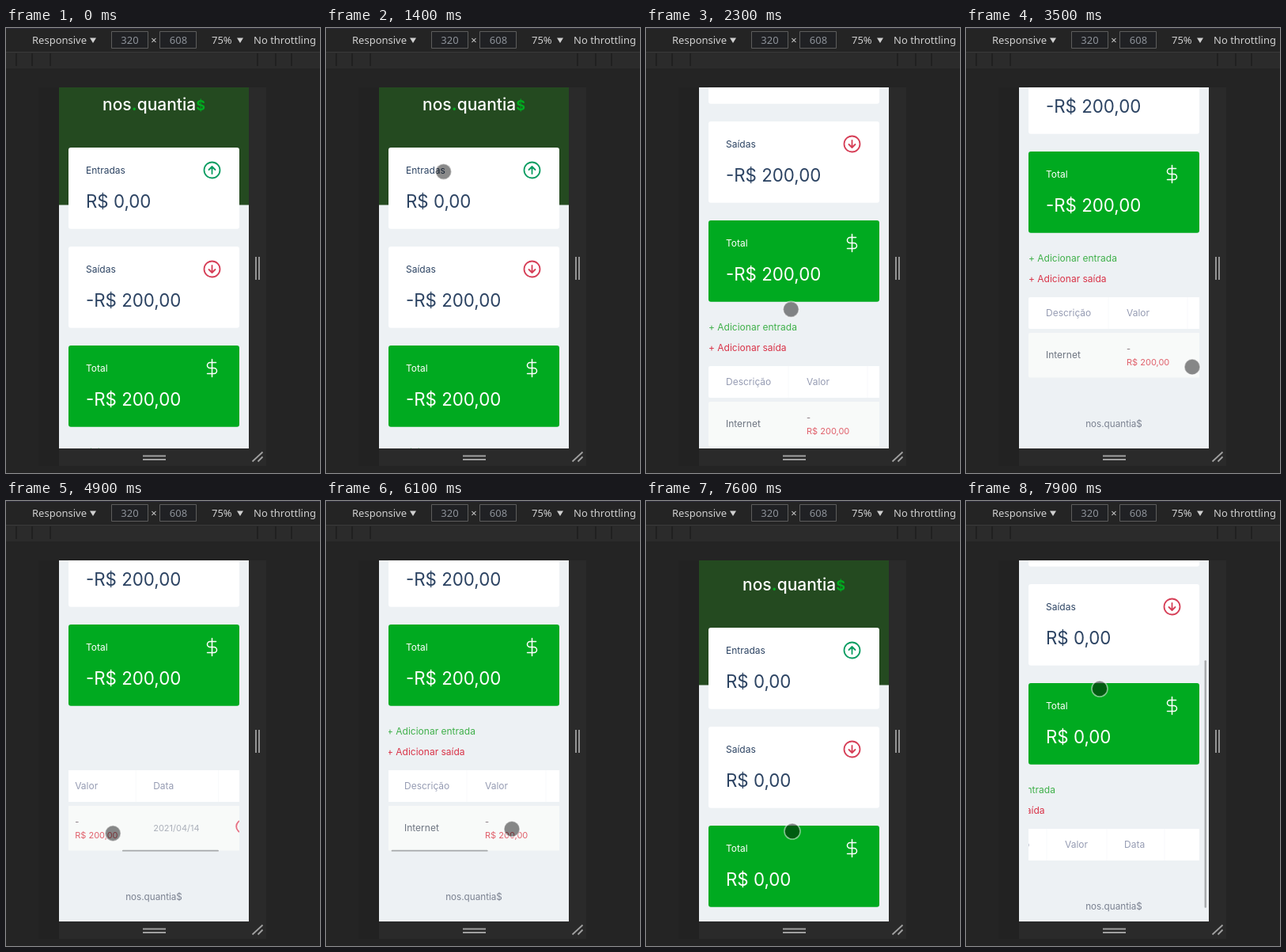
Recreate the animation shown at these times as an HTML page. Size 397 by 562 pixels, loop 8000 ms.

```html
<!DOCTYPE html>
<html lang="pt-BR">
<head>
<meta charset="utf-8">
<style>
  html, body { margin: 0; width: 100%; height: 100%; overflow: hidden; background: #242424; }
  svg { display: block; }
  text { font: 12px Inter, sans-serif; white-space: pre; }
  .bar text { font: 13px "Noto Sans", sans-serif; fill: #d0d0d0; }
  .bar .dim { fill: #8d9299; }
  .logo { font-size: 21px; font-weight: 500; fill: #fff; }
  .logo tspan { font-weight: 700; fill: #00aa20; }
  .value { font-size: 22.3px; }
  .small { font-size: 11px; }
  .card { fill: #2d4463; }
  .total { fill: #fff; }
  .head { fill: #969cb3; }
  .line { fill: none; stroke-width: 1.8; stroke-linecap: round; stroke-linejoin: round; }
</style>
</head>
<body>
<svg width="397" height="562" viewBox="0 0 397 562">
  <defs>
    <clipPath id="pageClip"><rect x="67" y="75" width="240" height="456"/></clipPath>
    <clipPath id="tableClip"><rect x="79" y="530" width="216" height="180"/></clipPath>
  </defs>

  <!-- Toolbar and ruler -->
  <g class="bar">
    <rect width="397" height="562" fill="#242424"/>
    <rect width="397" height="1" fill="#2b2a38"/>
    <rect y="30" width="397" height="1" fill="#3a3a3a"/>
    <rect y="31" width="397" height="20" fill="#2b2b2b"/>
    <path d="M13 32v16M33 32v16M56 32v16M318 32v16M341 32v16M361 32v16" stroke="#202020" stroke-width="2"/>
    <text x="33" y="20">Responsive</text>
    <path d="M106 12.5h8l-4 6.5zM292 12.5h8l-4 6.5z" fill="#d0d0d0"/>
    <path d="M133.5 4.5h46v21h-46zM194.5 4.5h46v21h-46z" fill="#202124" stroke="#5c5c5c"/>
    <text class="dim" x="156.5" y="20" text-anchor="middle">320</text>
    <text x="187" y="20" text-anchor="middle">×</text>
    <text class="dim" x="218" y="20" text-anchor="middle">608</text>
    <text x="260" y="20">75%</text>
    <text x="313" y="20">No throttling</text>
  </g>

  <!-- Device frame -->
  <rect x="41" y="75" width="26" height="478" fill="#222"/>
  <path d="M307 75h22v478H67v-22h240z" fill="#2a2a2a"/>
  <path d="M316 289v29M320 289v29M173 540.5h29M173 545h29M311.5 547.5l13-12M318.5 547.5l6-6" stroke="#a0a0a0" stroke-width="1.8"/>

  <!-- Page, laid out at scroll zero -->
  <g clip-path="url(#pageClip)">
    <rect x="67" y="75" width="240" height="456" fill="#edf1f4"/>
    <g id="page">
      <rect x="67" y="75" width="240" height="157.5" fill="#244a20"/>
      <text class="logo" x="122" y="113">nos<tspan>.</tspan>quantia<tspan style="font-size:18px">$</tspan></text>
      <g id="cards"></g>
      <g clip-path="url(#tableClip)">
        <g id="table">
          <text x="79" y="549" fill="#3fb04a">+ Adicionar entrada</text>
          <text x="79" y="575" fill="#d93348">+ Adicionar saída</text>
          <rect x="79" y="594" width="368" height="40" rx="2" fill="#fff"/>
          <path id="edges" stroke="#f8f9fb"/>
          <text class="head" x="101" y="618">Descrição</text>
          <text class="head" x="203" y="618">Valor</text>
          <text class="head" id="dateHead" y="618">Data</text>
          <g id="row">
            <rect x="79" y="639" width="368" height="56.5" rx="2" fill="#f8faf9"/>
            <text x="101" y="671" fill="#6d7480">Internet</text>
            <text class="small" x="203" y="663" fill="#80737b">-</text>
            <text class="small" x="203" y="680" fill="#e0606b">R$ 200,00</text>
            <text class="small" x="302" y="671" fill="#abb0ba">2021/04/14</text>
            <g class="line" stroke="#e67083"><circle cx="415" cy="665" r="8"/><path d="M411.5 665h7"/></g>
          </g>
        </g>
        <rect id="hBar" y="694.8" width="122" height="1.8" rx="1" fill="#a5a8aa"/>
      </g>
      <text id="footer" x="187" text-anchor="middle" fill="#7b8291" style="font-size:11.7px">nos.quantia$</text>
    </g>
    <rect id="vBar" x="301.5" width="2.5" rx="1" fill="#a9abad"/>
  </g>

  <path id="arrow" d="M.5 .5v16l3.8-3.4 2.7 6.2 2.8-1.2-2.7-6h5z" fill="#111" stroke="#ccc"/>
  <circle id="touch" r="10" fill="#000" fill-opacity=".46" stroke="#fff" stroke-opacity=".5" stroke-width="1.6"/>
</svg>

<script>
const $ = id => document.getElementById(id);
const set = (id, attrs) => {
  for (const key in attrs) $(id).setAttribute(key, attrs[key]);
};
const show = (id, on) => set(id, { visibility: on ? 'visible' : 'hidden' });
const move = (id, x, y) => set(id, { transform: `translate(${x} ${y})` });
const clamp = (v, max) => Math.max(0, Math.min(max, v));

const LOOP = 8000, STEP = 100;
const VIEW = { width: 216, height: 456 };
const ring = '<circle r="10"/>';
const cards = [
  ['Entradas', 'card', '#fff', '#0b9d62', ring + '<path d="M0 4.5v-9M-4-.5l4-4 4 4"/>'],
  ['Saídas', 'card', '#fff', '#d63f57', ring + '<path d="M0-4.5v9M-4 .5l4 4 4-4"/>'],
  ['Total', 'total', '#00aa20', '#fff',
    '<path stroke-width="1.5" d="M0-11v22M5-7h-7.5a3.5 3.5 0 0 0 0 7h5a3.5 3.5 0 0 1 0 7h-8.5"/>']
];
$('cards').innerHTML = cards.map(([name, cls, fill, color, icon], i) => `
  <g class="${cls}" transform="translate(79 ${160 + 125 * i})">
    <rect width="216" height="102.8" rx="3" fill="${fill}"/>
    <text x="22" y="33">${name}</text>
    <text class="value" id="value${i}" x="22" y="76">R$ 0,00</text>
    <g class="line" stroke="${color}" transform="translate(181.5 28.5)">${icon}</g>
  </g>`).join('');

// Pointer moves: start, end, x, y, and what the move does on its way.
const moves = [
  [300, 400, 72, 50],
  [500, 900, 225, 35],
  [1000, 1200, 135, 109],
  [1300, 1800, 203, 471],
  [1800, 2200, 190, 313, 'page'],
  [2200, 2500, 170, 440],
  [2500, 2800, 165, 350, 'page'],
  [2800, 3000, 128, 422],
  [3100, 3500, 286, 428],
  [3600, 4000, 113, 420],
  [4100, 4600, 251, 421],
  [4600, 5100, 58, 419, 'table'],
  [5300, 5500, 85, 416],
  [5500, 6200, 260, 414, 'table'],
  [6200, 6700, 42, 418, 'table'],
  [6700, 6900, 263, 411],
  [7100, 7300, 263, 411, 'delete'],
  [7300, 7600, 185, 417],
  [7600, 7900, 169, 237, 'page']
];

// Replays the moves up to t; a drag scrolls by as much as the pointer travels.
function stateAt(t) {
  const s = { x: 7, y: 90, page: 9, table: 0, height: 710, width: 368, hasRow: true };
  for (const [start, end, toX, toY, action] of moves) {
    if (t < start) break;
    const p = Math.min(1, (t - start) / (end - start));
    const x = s.x + (toX - s.x) * p, y = s.y + (toY - s.y) * p;
    if (action === 'delete') Object.assign(s, { page: 0, height: 648, width: 294, hasRow: false });
    if (action === 'page') s.page += s.y - y;
    if (action === 'table') s.table += s.x - x;
    s.page = clamp(s.page, s.height - VIEW.height);
    s.table = clamp(s.table, s.width - VIEW.width);
    s.dragging = t > start && t <= end + STEP ? action : null;
    Object.assign(s, { x, y });
  }
  return s;
}

function draw(t) {
  const { x, y, page, table, height, width, hasRow, dragging } = stateAt(t);
  const dateX = hasRow ? 280 : 256, lastX = hasRow ? 384.5 : 329;

  move('page', 0, -page);
  move('table', -table, 0);
  $('value1').textContent = $('value2').textContent = hasRow ? '-R$ 200,00' : 'R$ 0,00';
  show('row', hasRow);
  set('dateHead', { x: dateX + 22 });
  set('edges', { d: [180, dateX, lastX].map(edge => `M${edge} 594v40`).join('') });
  set('footer', { y: height + 48 });

  set('hBar', { x: 81.5 + table / width * 208 });
  show('hBar', dragging === 'table');
  set('vBar', { y: 78 + page / height * 444, height: VIEW.height / height * 444 });
  show('vBar', dragging === 'page');

  move('arrow', x, y);
  move('touch', x, y);
  show('arrow', t >= 300 && t < 1200);
  show('touch', t >= 1200);
}

function tick(now) {
  draw(Math.floor(now % LOOP / STEP) * STEP);
  requestAnimationFrame(tick);
}
draw(0);
requestAnimationFrame(tick);
</script>
</body>
</html>
```
